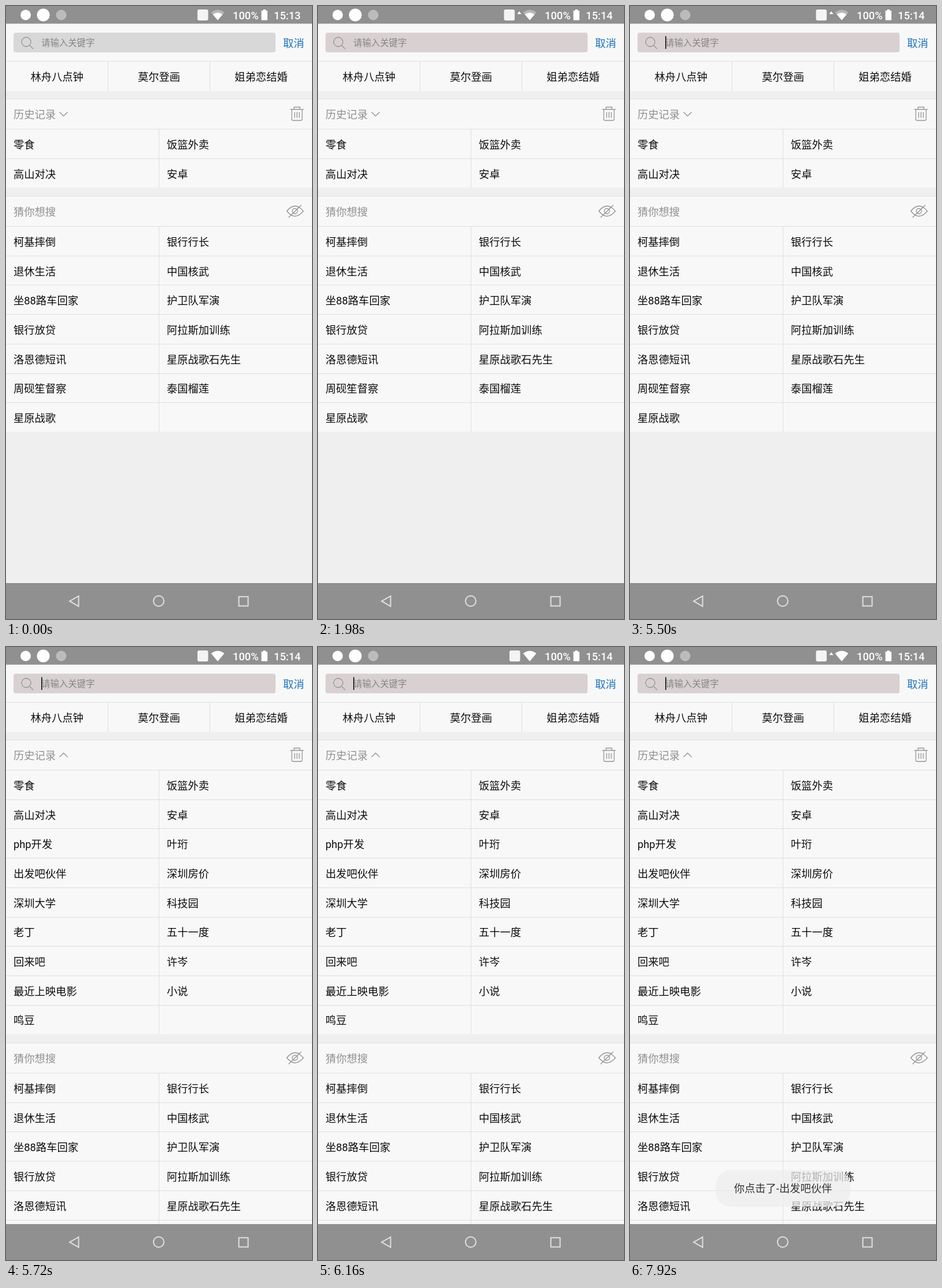
Recreate the animation shown at these times as an HTML page. Size 529 by 1058 pixels, loop 8000 ms.

```html
<!DOCTYPE html>
<html lang="zh-CN">
<head>
<meta charset="utf-8">
<style>
  html, body { margin: 0; width: 100%; height: 100%; overflow: hidden; background: #efefef; }
  svg { display: block; width: 529px; height: 1058px; }
  text { font: 18.3px Roboto, "Noto Sans CJK SC", "Noto Sans CJK", sans-serif; fill: #0c0c0c; }
  .muted { fill: #909090; }
  .mid { text-anchor: middle; }
  .status { font-weight: 500; fill: #fff; }
  .hint { font-size: 15.4px; fill: #858585; }
  .panel { fill: #f8f8f8; }
  .rule { fill: none; stroke: #dfdfdf; shape-rendering: crispEdges; }
  .icon { fill: none; stroke: #949494; stroke-width: 1.3; }
  .nav { fill: none; stroke: #e0e0e0; stroke-width: 2; }
  .white { fill: #fff; }
</style>
</head>
<body>
<script>
const LOOP = 8000, ROW = 50.7;

const tabs = ['林舟八点钟', '莫尔登画', '姐弟恋结婚'];
const recent = [['零食', '饭篮外卖'], ['高山对决', '安卓']];
const older = [
  ['php开发', '叶珩'], ['出发吧伙伴', '深圳房价'], ['深圳大学', '科技园'], ['老丁', '五十一度'],
  ['回来吧', '许岑'], ['最近上映电影', '小说'], ['鸣豆', '']
];
const guesses = [
  ['柯基摔倒', '银行行长'], ['退休生活', '中国核武'], ['坐88路车回家', '护卫队军演'],
  ['银行放贷', '阿拉斯加训练'], ['洛恩德短讯', '星原战歌石先生'], ['周砚笙督察', '泰国榴莲'], ['星原战歌', '']
];

// Text is placed by the vertical centre of its glyphs.
const label = (x, cy, text, cls = '') => `<text x="${x}" y="${cy + 6.8}" class="${cls}">${text}</text>`;
const rule = (d) => `<path class="rule" d="${d}"/>`;
const panel = (y, h) => `<rect class="panel" y="${y}" width="529" height="${h}"/>`;

function rows(top, cells) {
  const height = cells.length * ROW;
  const body = cells.map(([left, right], i) => {
    const y = top + i * ROW;
    return rule(`M0 ${Math.round(y) - .5}H529`) + label(13, y + 26, left) + label(278, y + 26, right);
  });
  return panel(top - 1, height) + body.join('') + rule(`M264.5 ${top}V${top + height - 1}`);
}

function header(top, title) {
  return panel(top, 52) + rule(`M0 ${top + .5}H529`) + label(13, top + 27, title, 'muted');
}

document.body.innerHTML = `<svg viewBox="0 0 529 1058">
  <rect width="529" height="1058" fill="#efefef"/>
  ${panel(30, 117)}
  <rect id="field" x="13" y="46" width="453" height="34" rx="4"/>
  <g class="icon" stroke-width="1.6"><circle cx="35" cy="62" r="8"/><path d="M40.5 67.5L47 74"/></g>
  <text class="hint" x="61" y="69.3">请输入关键字</text>
  <rect id="caret" x="61" y="52" width="1.5" height="22"/>
  <text x="479" y="70.5" style="fill:#1c72bb">取消</text>
  ${rule('M0 95.5H529M176.5 96V147M352.5 96V147')}
  ${tabs.map((name, i) => label(88.2 + i * 176.4, 122.5, name, 'mid')).join('')}

  ${header(160, '历史记录')}
  <path id="chevron" class="icon"/>
  <path class="icon" d="M491.5 178.5H514.5M498 178V174.5H508V178M494 179V195Q494 197.5 496.5 197.5H509.5Q512 197.5 512 195V179M499 183V193M503 183V193M507 183V193"/>
  ${rows(213, recent)}
  <g id="older">${rows(213 + 2 * ROW, older)}</g>

  <g id="guess">
    ${header(328, '猜你想搜')}
    <path class="icon" d="M485.5 354Q499.500 336.500 514 354Q499.500 371.500 485.500 354ZM488.500 365L510.500 343.500"/>
    <circle class="icon" cx="499.500" cy="354" r="4.500"/>
    ${rows(381, guesses)}
  </g>

  <g id="toast">
    <rect x="148" y="903" width="233" height="63" rx="26" fill="#eeeeee" fill-opacity=".74"/>
    <text class="mid" x="264.5" y="941" style="fill:#333">你点击了-出发吧伙伴</text>
  </g>

  <rect width="529" height="30.500" fill="#909090"/>
  <circle class="white" cx="34" cy="15.500" r="9"/>
  <circle class="white" cx="64.500" cy="15.500" r="11"/>
  <circle cx="95.500" cy="15.500" r="9" fill="#bcbcbc"/>
  <rect id="nfc" class="white" y="6" width="18.500" height="19" rx="3" opacity=".9"/>
  <path id="data" class="white" d="M344.500 14L348 9L351.500 14Z"/>
  <path id="wifiBack" class="white" d="M354.500 11Q366 2.500 377.500 11L366 24.500Z"/>
  <path class="white" d="M357.500 14.500Q366 8.500 374.500 14.500L366 24.500Z"/>
  ${label(392, 16.2, '100%', 'status')}
  <path class="white" d="M441.500 8H444.500V6H449V8H452V24.500H441.500Z"/>
  <text id="clock" class="status" x="463" y="23"></text>

  <rect y="996" width="529" height="62" fill="#909090"/>
  <path class="nav" d="M125.500 1018.500V1036L110 1027.200ZM402.500 1019.500H418.500V1035.500H402.500Z"/>
  <circle class="nav" cx="264" cy="1027" r="9"/>
</svg>`;

const el = (id) => document.getElementById(id);
const show = (id, on) => el(id).setAttribute('visibility', on ? 'visible' : 'hidden');
const within = (t, ...spans) => spans.some(([from, to]) => t >= from && t < to);

function draw(t) {
  const open = within(t, [5720, 5940], [6160, LOOP]);
  show('older', open);
  el('guess').setAttribute('transform', `translate(0 ${open ? 355 : 0})`);
  el('chevron').setAttribute('d', open ? 'M92.500 190L99.500 183L106.500 190' : 'M92.500 183L99.500 190L106.500 183');

  el('field').setAttribute('fill', t < 220 ? '#d8d8d8' : '#d9d1d1');
  show('caret', within(t, [220, 1980], [3740, 6380], [7480, LOOP]));

  const data = within(t, [1540, 5720], [5940, 6160], [6600, LOOP]);
  show('data', data);
  el('nfc').setAttribute('x', data ? 321.5 : 331);
  el('wifiBack').setAttribute('opacity', t < 5720 ? .35 : 1);
  el('clock').textContent = t < 440 ? '15:13' : '15:14';

  // The message fades in by equal steps of 220 ms.
  const step = Math.floor((t - 7040) / 220);
  el('toast').setAttribute('opacity', step < 0 ? 0 : Math.min(1, .28 + .18 * step));
}

function tick() {
  draw(performance.now() % LOOP);
  requestAnimationFrame(tick);
}
tick();
</script>
</body>
</html>
```
